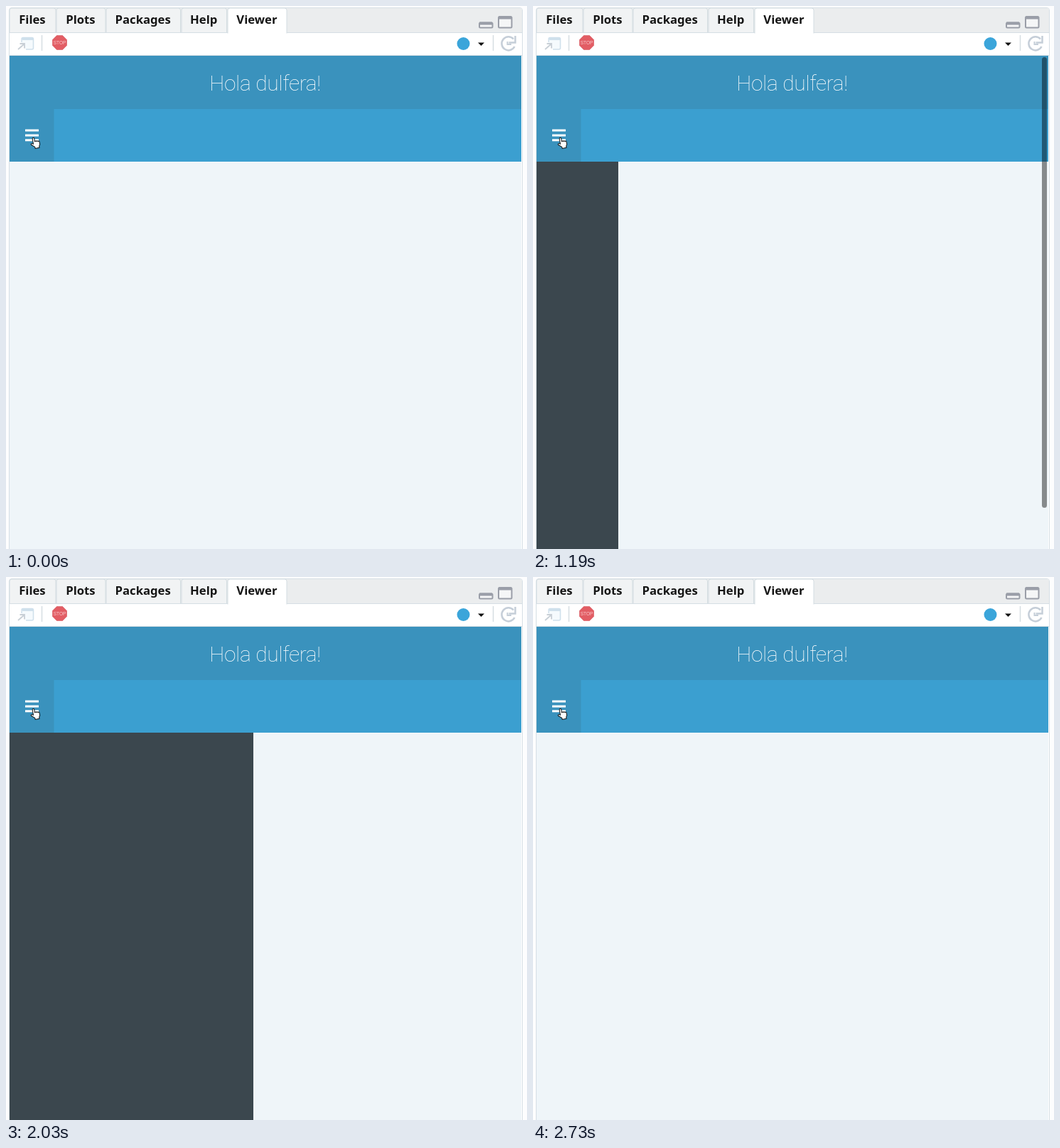
These frames come from a looping animation (733x764 px, 2.8 s). An HTML page:

```html
<!DOCTYPE html>
<html lang="es">
<head>
<meta charset="utf-8">
<title>Sidebar toggle</title>
<style>
html, body { margin: 0; width: 100%; height: 100%; overflow: hidden; background: #fdfdfe; }
svg { display: block; }
.tabs text { font: 700 16.7px "Noto Sans", "Open Sans", sans-serif; fill: #151515; text-anchor: middle; }
.title { font: 200 30px Roboto, "Liberation Sans", sans-serif; letter-spacing: -.35px; fill: #fff; text-anchor: middle; }
.stop { font: 6.5px "Liberation Sans", Arial, sans-serif; fill: #f9c9cb; text-anchor: middle; }
</style>
</head>
<body>
<svg width="733" height="764" viewBox="0 0 733 764">
  <!-- pane frame -->
  <path d="M4.5 764V6q0-3.5 3.5-3.5H723q3.5 0 3.5 3.5V764" fill="#fff" stroke="#d6dfe5"/>
  <path d="M5 37V6q0-3 3-3H723q3 0 3 3V37Z" fill="#ebedee"/>
  <path d="M5 37.5H726M5 69.5H726" stroke="#d5dee4"/>
  <g class="tabs" id="tabs"></g>

  <!-- toolbar -->
  <g fill="none">
    <path d="M22 51V46.5q0-2 2-2H36.5q2 0 2 2V59q0 2-2 2H28" stroke="#cfe0ec" stroke-width="1.5" fill="#f5fafd"/>
    <path d="M23 46.5H38" stroke="#cfe0ec" stroke-width="3"/>
    <path d="M17 61L25 54M19.5 53H26V59.5" stroke="#c8cfd6" stroke-width="1.8"/>
    <path d="M50.5 41V63M685.5 41V63" stroke="#d6dde2" stroke-width="1.5"/>
    <path d="M71.4 41.5H79.6L85.5 47.4V55.6L79.6 61.5H71.4L65.5 55.6V47.4Z" fill="#e25d64" stroke="#d6575e" stroke-width=".6"/>
    <circle cx="643.5" cy="53" r="9" fill="#3ba5da"/>
    <path d="M664 51.5H673L668.5 56Z" fill="#111"/>
    <path d="M714 46.5A9.5 9.5 0 1 0 715.5 57" stroke="#c5ced8" stroke-width="2.5"/>
    <path d="M716.5 42V51.5H707.5" stroke="#c5ced8" stroke-width="2.5"/>
    <path d="M711 54H705.5V50" stroke="#c5ced8" stroke-width="2"/>
    <g stroke="#9a9ea8" stroke-width="2">
      <rect x="666" y="23.5" width="18.5" height="7" rx="1.5" fill="#f5f6f7"/>
      <rect x="693" y="15" width="18.5" height="15.5" rx="1.5" fill="#f5f6f7"/>
      <path d="M666 24.5H684M693 16.5H711" stroke-width="4"/>
    </g>
  </g>
  <text class="stop" x="75.5" y="54">STOP</text>

  <!-- page -->
  <path d="M5 70H725V764H5Z" fill="#eff5f9"/>
  <path d="M5 70H725V219H5Z" fill="#3a92bd"/>
  <path d="M67.5 145H725V219H67.5Z" fill="#3b9fd0"/>
  <text class="title" x="364.5" y="119">Hola dulfera!</text>
  <rect id="side" x="5" y="219" height="545" fill="#3b474e"/>
  <rect id="bar" x="716" y="72" width="7" height="634" rx="3.5" fill="#000" fill-opacity=".44"/>
  <path d="M27 175H46M27 182H46M27 188.7H46" stroke="#fff" stroke-width="3"/>
  <g id="ring" fill="none">
    <circle cx="39" cy="184" r="30" stroke="#fff" stroke-width="3.4"/>
    <circle cx="39" cy="184" r="30" stroke="#222" stroke-width="1.6"/>
  </g>
  <path transform="translate(33.5 186) rotate(-10)" fill="#fff" stroke="#111" stroke-linejoin="round"
    d="M3.5 1.5a1.3 1.3 0 0 1 2.6 0V6a1.2 1.2 0 0 1 2.3 .2a1.1 1.1 0 0 1 2.1 .5a1 1 0 0 1 1.9 .6V11L11 13.5V15.5H5V13.5L.3 9.5a1.2 1.2 0 0 1 1.8-1.4L3.5 9Z"/>
</svg>
<script>
const LOOP = 2800, OPEN = 1108.5, CLOSE = 2272.5, SLIDE = 380, WIDTH = 343;
const el = id => document.getElementById(id);
const clamp = v => Math.max(0, Math.min(1, v));

const tabs = [["Files", 5, 70], ["Plots", 71, 140], ["Packages", 141, 245.5], ["Help", 247, 310.5], ["Viewer", 312, 395]];
el("tabs").innerHTML = tabs.map(([name, l, r]) => {
  const active = name === "Viewer", bottom = active ? 38.5 : 37;
  return `<path d="M${l} ${bottom}V6q0-3 3-3H${r - 3}q3 0 3 3V${bottom}"
    fill="${active ? "#fff" : "#f1f3f4"}" stroke="#d3dce1"/>
    <text x="${(l + r) / 2 - .6}" y="25">${name}</text>`;
}).join("");

// The CSS "ease" curve, solved by bisection.
function ease(x) {
  let lo = 0, hi = 1;
  for (let i = 0; i < 20; i++) {
    const s = (lo + hi) / 2;
    if (.75 * s * (1 - s) + s ** 3 < x) lo = s; else hi = s;
  }
  const s = lo, u = 1 - s;
  return .3 * u * u * s + 3 * u * s * s + s ** 3;
}

const slide = (t, start) => ease(clamp((t - start) / SLIDE));

function barOpacity(dt) {
  return dt < 0 ? 0 : 1 - clamp((dt - 240) / 110);
}

function draw(t) {
  const width = WIDTH * (slide(t, OPEN) - slide(t, CLOSE));
  const pressed = [OPEN, CLOSE].some(s => t >= s - 130 && t < s);
  el("side").setAttribute("width", Math.round(width));
  el("bar").setAttribute("opacity", Math.max(barOpacity(t - OPEN), barOpacity(t - CLOSE)));
  el("ring").setAttribute("opacity", pressed ? 1 : 0);
}

const begin = performance.now();
function tick() {
  draw((performance.now() - begin) % LOOP);
  requestAnimationFrame(tick);
}
tick();
</script>
</body>
</html>
```
